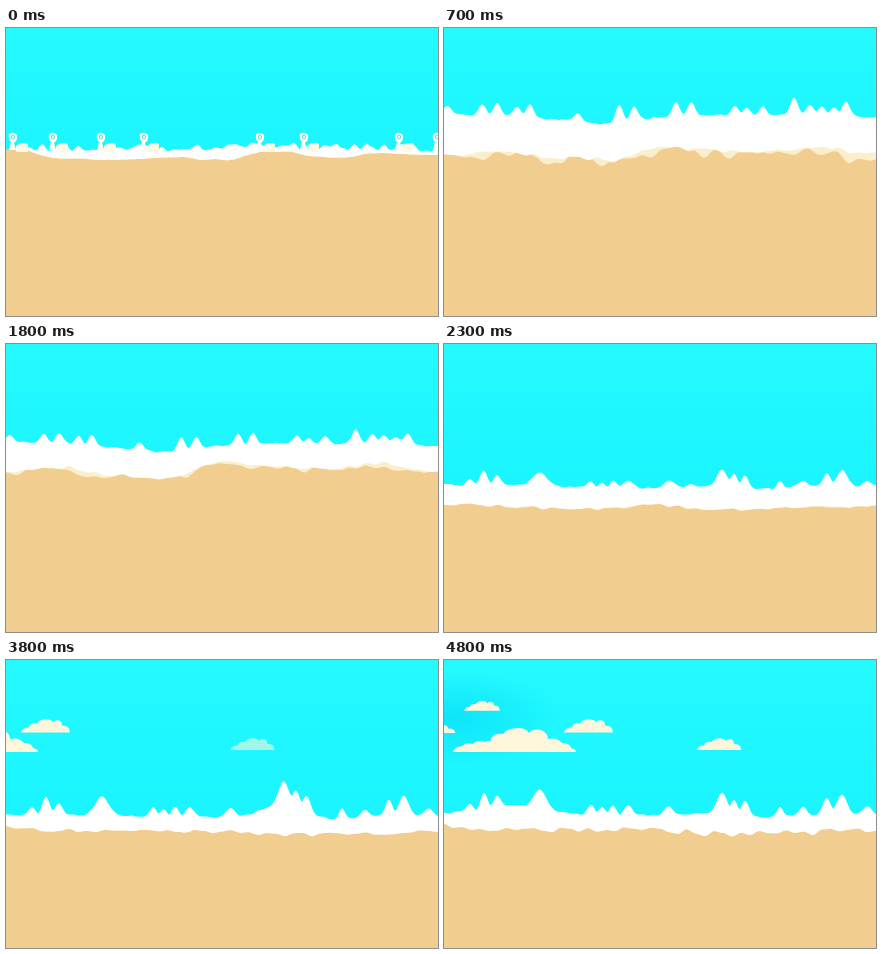
Animation, 432 px wide and 288 px high, one loop 4.9 s. Source, as an HTML page:

```html
<!DOCTYPE html>
<html lang="en">
<head>
<meta charset="utf-8">
<title>Shore</title>
<style>
html, body { margin: 0; width: 100%; height: 100%; overflow: hidden; background: #f1cd90; }
svg { display: block; width: 100vw; height: 100vh; }
</style>
</head>
<body>
<svg viewBox="0 0 432 288">
  <defs>
    <linearGradient id="sky" gradientUnits="userSpaceOnUse" x1="0" y1="0" x2="0" y2="160">
      <stop offset="0" stop-color="#24faff"/>
      <stop offset="1" stop-color="#19f4ff"/>
    </linearGradient>
    <radialGradient id="shade">
      <stop offset="0" stop-color="#00d4f4"/>
      <stop offset="1" stop-color="#00d4f4" stop-opacity="0"/>
    </radialGradient>
    <filter id="soft" filterUnits="userSpaceOnUse" x="-12" y="-12" width="456" height="312">
      <feGaussianBlur stdDeviation=".6"/>
    </filter>
    <path id="puff" d="M0 14Q1 9 8 9Q9 4 16 5Q20 0 27 1Q32 2 32 4Q34 1 38 2Q41 3 41 7Q49 7 49 14Z"/>
    <path id="bank" d="M0 24Q2 18 10 18Q12 14 20 16Q24 11 32 14Q36 12 37 14Q39 4 50 6Q54 0 65 0Q73 0 76 5Q80 0 88 2Q95 5 95 11Q104 9 109 15Q117 15 118 20Q123 21 123 24Z"/>
  </defs>
  <rect width="432" height="288" fill="#f1cd90"/>
  <g filter="url(#soft)">
    <path id="wet" fill="#fbeecb"/>
    <path id="foam" fill="#fff"/>
    <path id="sea" fill="url(#sky)"/>
    <g id="drops"></g>
  </g>
  <ellipse id="haze" cx="10" cy="58" rx="110" ry="48" fill="url(#shade)"/>
  <g id="clouds" fill="#fdf6da"></g>
</svg>
<script>
const LOOP = 4900, STEP = 100, WIDTH = 432, PAD = 10, GRID = 2;
const NS = 'http://www.w3.org/2000/svg';
const byId = id => document.getElementById(id);
const clamp = v => Math.max(0, Math.min(1, v));
const mix = (a, b, k) => a + (b - a) * k;
const ease = k => k * k * (3 - 2 * k);
const xs = [];
for (let x = -PAD; x <= WIDTH + PAD; x += GRID) xs.push(x);

function add(parent, tag, attrs) {
  const el = parent.appendChild(document.createElementNS(NS, tag));
  for (const key in attrs) el.setAttribute(key, attrs[key]);
  return el;
}

function hash(n, seed) {
  const v = Math.sin(n * 127.1 + seed * 311.7) * 43758.5453;
  return v - Math.floor(v);
}

// Smooth seeded noise from -1 to 1.
function noise(x, seed, cell) {
  const n = Math.floor(x / cell), k = ease(x / cell - n);
  return 2 * mix(hash(n, seed), hash(n + 1, seed), k) - 1;
}

// Evenly spaced heights across the stage, eased between neighbours.
function profile(heights, x) {
  const p = clamp(x / WIDTH) * (heights.length - 1);
  const n = Math.min(Math.floor(p), heights.length - 2);
  return mix(heights[n], heights[n + 1], ease(p - n));
}

const bump = (x, centre, height, width) => height * Math.exp(-(((x - centre) / width) ** 2));
const crown = (peaks, x) => Math.max(...peaks.map(([at, height, width = 5]) => bump(x, at, height, width)));

// Spikes of the far wave and of the near wave: centre, height, optional width.
const FAR = [[4, 9], [38, 12], [53, 14], [73, 11], [86, 15], [134, 9], [175, 20], [190, 16],
  [232, 17], [247, 17], [291, 11], [303, 8], [319, 10], [350, 18], [366, 10], [378, 8], [390, 8], [402, 15]];
const NEAR = [[26, 8], [40, 18], [53, 12], [96, 19, 9], [147, 10], [158, 9], [169, 11], [184, 11, 6],
  [224, 9, 6], [278, 21, 7], [290, 15], [301, 15], [336, 10, 4], [359, 8], [383, 17], [398, 20, 7], [423, 8, 6]];

const FAR_TOP = [0, 2, 7, 13, 5, 2, 2, 0, 5];
const FAR_FOOT = [11, 5, 13, 16, 1, 4, 7, 1, 10];
const NEAR_TOP = [0, 0, 0, 3, 2, 0, 4, 1, 1];
const NEAR_FOOT = [0, 3, 4, 4, 4, 8, 7, 6, 4];
const REST_FOOT = [0, 12, 13, 11, 14, 5, 12, 7, 10];

function pose({ seed, top, topShape, topGain = 1, peaks, peakGain = 1, mound = [0, 0, 1],
  foot, footShape, footGain = 1, ripple = 2, cell = 9, chop = 1, depth = 0 }) {
  const foam = xs.map(x => foot + footGain * profile(footShape, x) + ripple * noise(x, seed, cell));
  return {
    top: xs.map(x => top + topGain * profile(topShape, x) - peakGain * crown(peaks, x)
      - bump(x, ...mound) + chop * noise(x, seed + 5, 6)),
    foam,
    wet: foam.map((y, i) => y + depth * Math.max(0, noise(xs[i], seed + 9, 13) + .3))
  };
}
const lift = (p, dy) => ({ ...p, top: p.top.map(y => y + dy) });
const far = options => pose({ topShape: FAR_TOP, peaks: FAR, footShape: FAR_FOOT, ...options });
const near = options => pose({ topShape: NEAR_TOP, peaks: NEAR, footShape: NEAR_FOOT, ...options });

const calm = far({ seed: 1, top: 119, topGain: .2, peakGain: .1, foot: 118, footShape: REST_FOOT, ripple: 1, cell: 15, chop: 4 });
const surge = far({ seed: 2, top: 87, foot: 114, ripple: 3, depth: 10 });
const ebb = far({ seed: 3, top: 107, topGain: .35, peakGain: .7, foot: 127, footGain: .55, depth: 5, chop: 2 });
const swell = far({ seed: 4, top: 98, topGain: .8, peakGain: .75, foot: 118, depth: 4 });
const low = near({ seed: 6, top: 154, peakGain: .9, foot: 166 });
const rise = near({ seed: 7, top: 155, mound: [279, 13, 26], foot: 167 });
const crest = near({ seed: 8, top: 153, mound: [72, 7, 35], foot: 166, ripple: 3 });

const KEYS = [[0, calm], [300, surge], [500, lift(surge, -12)], [1100, ebb],
  [1500, lift(surge, -14)], [1800, swell], [2400, lift(low, -4)], [2900, low],
  [3800, rise], [4800, crest]];

// x is the left edge at the end of the loop; speed in px per ms.
const LAST = 4800;
const CLOUDS = [
  { ref: 'puff', x: 253, y: 77.5, speed: .0285, scale: .9, from: 2400, fade: 2400 },
  { ref: 'puff', x: 120, y: 58.5, speed: .105, scale: 1 },
  { ref: 'bank', x: 9, y: 68, speed: .1, scale: 1 },
  { ref: 'puff', x: 20, y: 40.5, speed: .07, scale: .73 },
  { ref: 'puff', x: -32, y: 64, speed: .06, scale: .88, scaleY: .65 }
];
for (const c of CLOUDS) c.el = add(byId('clouds'), 'use', { href: '#' + c.ref });

for (const x of [7, 47, 95, 138, 254, 298, 393, 431]) {
  const drop = add(byId('drops'), 'g', { transform: `translate(${x} 109)` });
  add(drop, 'path', { d: 'M3 9Q8 4 15 7V15H3Z', fill: '#fbfbe6' });
  add(drop, 'path', { d: 'M-4 -3Q0 -6 4 -2Q5 3 1 6L3 13H-4L-2 5Q-5 2 -4 -3Z', fill: '#fdfff6' });
  add(drop, 'ellipse', { rx: 1.6, ry: 2, fill: 'none', stroke: '#5fdfe0' });
}

const area = ys => `M${-PAD} ${-PAD}L` + ys.map((y, i) => `${xs[i]} ${y.toFixed(1)}`).join('L') + `V${-PAD}Z`;

function draw(t) {
  let i = 0;
  while (i < KEYS.length - 2 && t >= KEYS[i + 1][0]) i++;
  const [t0, a] = KEYS[i], [t1, b] = KEYS[i + 1];
  const k = clamp((t - t0) / (t1 - t0));
  for (const [id, part] of [['sea', 'top'], ['foam', 'foam'], ['wet', 'wet']])
    byId(id).setAttribute('d', area(a[part].map((y, n) => mix(y, b[part][n], k))));
  byId('drops').setAttribute('opacity', clamp(1 - t / 200));
  byId('haze').setAttribute('opacity', .55 * clamp((t - 3800) / 1000));
  for (const c of CLOUDS) {
    const x = c.x + (t - LAST) * c.speed;
    c.el.setAttribute('transform', `translate(${x} ${c.y}) scale(${c.scale} ${c.scaleY || c.scale})`);
    c.el.setAttribute('opacity', c.fade ? clamp((t - c.from) / c.fade) : 1);
  }
}

const start = performance.now();
function tick() {
  const t = (performance.now() - start) % LOOP;
  draw(Math.floor(t / STEP) * STEP);
  requestAnimationFrame(tick);
}
draw(0);
requestAnimationFrame(tick);
</script>
</body>
</html>
```
